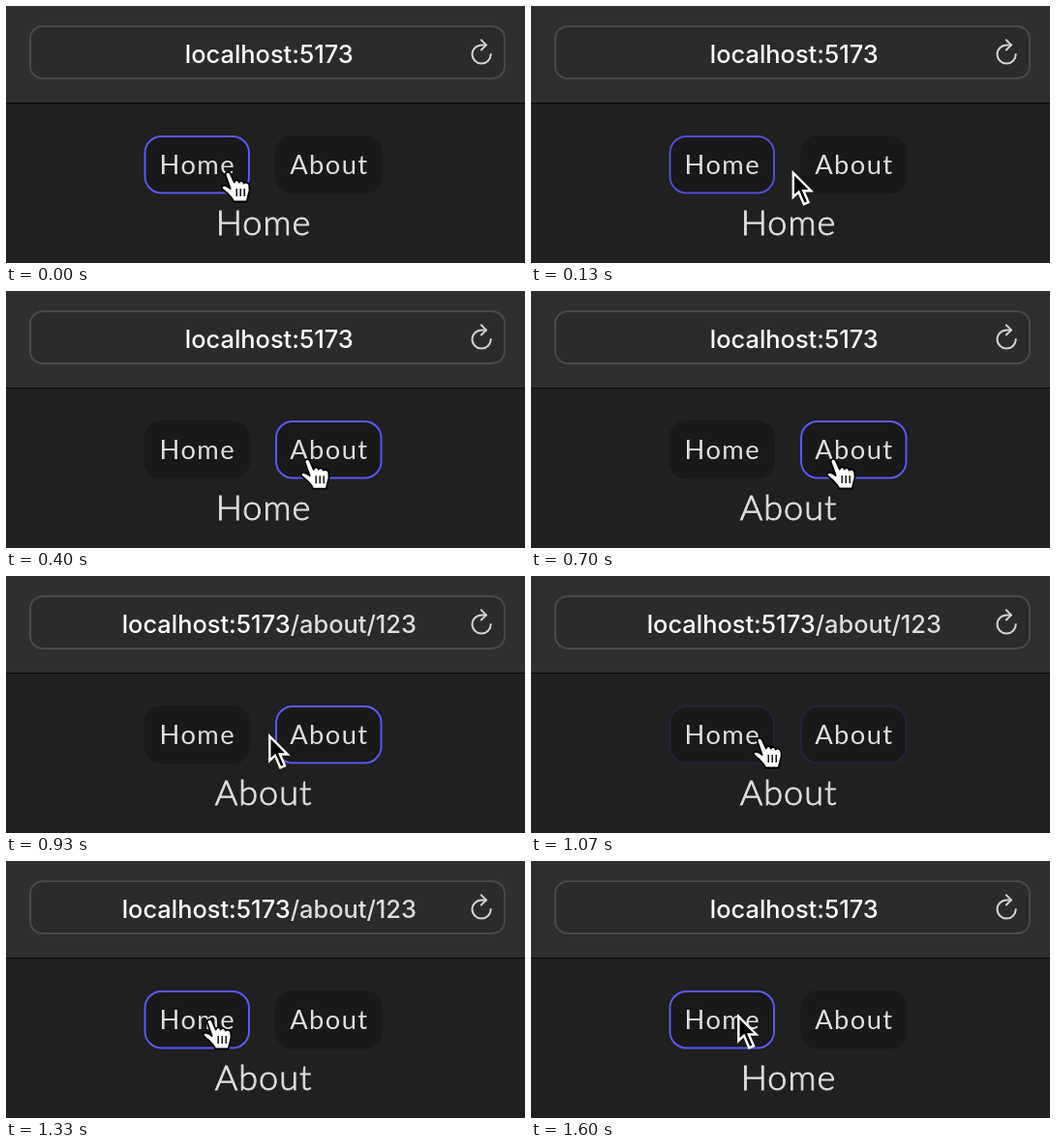
These frames come from a looping animation (536 by 266 pixels, 1730 ms). An HTML page:

```html
<!DOCTYPE html>
<html lang="en">
<head>
<meta charset="utf-8">
<title>Route navigation</title>
<style>
  html, body { margin: 0; width: 100%; height: 100%; overflow: hidden; background: #202020; }
  svg { display: block; }
  text { text-anchor: middle; }
  .url { font: 500 25.4px Inter, "Liberation Sans", sans-serif; fill: #fff; }
  .path { fill: #dddddf; }
  .button rect { fill: #191919; }
  .button .ring { fill: none; stroke: #5b59f3; stroke-width: 2; }
  .button text { font: 400 27.3px Lato, "Open Sans", sans-serif; letter-spacing: 1.4px; fill: #dedede; }
  .heading { font: 300 36px Lato, "Open Sans", sans-serif; letter-spacing: 1px; fill: #dedede; stroke: #dedede; stroke-width: .9; }
  .reload { fill: none; stroke: #d2d2d4; stroke-width: 2; stroke-linecap: round; stroke-linejoin: round; }
  .arrow { fill: #000; stroke: #fff; stroke-width: 2.4; }
  .hand { fill: #fff; stroke: #000; stroke-width: 1.8; stroke-linejoin: round; }
  .creases { stroke-width: 1.4; }
</style>
</head>
<body>
<svg width="536" height="266" viewBox="0 0 536 266">
  <rect width="536" height="266" fill="#202020"/>
  <rect width="536" height="100" fill="#2f2f31"/>
  <rect y="100" width="536" height="1" fill="#060606"/>

  <rect x="25" y="21" width="490" height="54" rx="13" fill="#2b2b2d" stroke="#49494b" stroke-width="2"/>
  <text class="url" x="271.8" y="59">localhost:5173<tspan class="path" id="path"></tspan></text>
  <g class="reload">
    <path d="M500.7 50A9.6 9.6 0 1 1 491.1 40.4H496"/>
    <path d="M490.8 35.3L496 40.4L490.8 45.5"/>
  </g>

  <g class="button">
    <rect x="142.5" y="134" width="109.5" height="60.5" rx="18"/>
    <rect class="ring" id="homeRing" x="143.5" y="135" width="107.5" height="58.5" rx="17"/>
    <text x="197.8" y="174">Home</text>
  </g>
  <g class="button">
    <rect x="278" y="134" width="110.5" height="60.5" rx="18"/>
    <rect class="ring" id="aboutRing" x="279" y="135" width="108.5" height="58.5" rx="17"/>
    <text x="333.9" y="174">About</text>
  </g>
  <text class="heading" id="heading" x="266" y="237.4">Home</text>

  <g id="cursor">
    <path class="arrow" id="arrow" transform="translate(2 -6)"
      d="M1.3 3V28L7 22.7L12.3 35.3L17 33.3L11.8 21.5H19.7Z"/>
    <g class="hand" id="hand" transform="translate(-.8 0)">
      <path d="M-2.5 3C-3 0 1 -1.5 2.5 1.5L6.5 10.5C7 8 11 7.5 11.5 10.5C12.5 8.5 16 8.5 16.5 11.5
        C18 10 21.5 10.5 22 13.5C22.8 17 22.5 20 21 24L19.5 30.5H6C5 27 2 24.5 -1 21.5
        C-3.5 19 -6.5 18 -6.5 15.5C-6 12.8 -1.5 13.2 2.5 17Z"/>
      <path class="creases" d="M9 17V25M13 17V25M17 17V25"/>
    </g>
  </g>
</svg>
<script>
const LOOP = 1730, TICK = 100 / 3, FADE = 250;
const $ = id => document.getElementById(id);

// Pointer path: tick, x, y
const route = [
  [0, 230, 172], [1, 234, 173], [3, 256, 175], [5, 279, 176.5], [7, 290, 177],
  [10, 305, 175.5], [12, 312, 174.2], [13, 313, 174], [23, 313, 174], [24, 311, 173.5],
  [26, 297, 171.5], [28, 269, 169], [30, 253, 168.5], [32, 237, 168],
  [35, 222, 166], [38, 213, 164.5], [40, 211, 164], [52, 211, 164]
];

const between = (k, from, to) => k >= from && k < to;

function pointAt(k) {
  const i = Math.max(1, route.findIndex(p => p[0] >= k));
  const [a, ax, ay] = route[i - 1], [b, bx, by] = route[i];
  const f = (k - a) / (b - a);
  return [ax + (bx - ax) * f, ay + (by - ay) * f];
}

// CSS "ease": cubic-bezier(.25, .1, .25, 1)
function ease(x) {
  if (x <= 0) return 0;
  if (x >= 1) return 1;
  const curve = (s, p, q) => 3 * s * (1 - s) * ((1 - s) * p + s * q) + s ** 3;
  let lo = 0, hi = 1;
  for (let i = 0; i < 20; i++) {
    const mid = (lo + hi) / 2;
    if (curve(mid, .25, .25) < x) lo = mid; else hi = mid;
  }
  return curve(lo, .1, 1);
}

const fadeFrom = (k, start) => ease((k - start) * TICK / FADE);

function setText(id, value) {
  if ($(id).textContent !== value) $(id).textContent = value;
}

function draw(ms) {
  const k = Math.floor((ms % LOOP + 3.4) / TICK);
  const [x, y] = pointAt(k);
  const isArrow = between(k, 3, 5) || between(k, 22, 24) || between(k, 28, 31) || k >= 48;

  $("cursor").setAttribute("transform", `translate(${x} ${y})`);
  $("arrow").style.display = isArrow ? "" : "none";
  $("hand").style.display = isArrow ? "none" : "";
  $("homeRing").style.opacity = k < 31 ? 1 - fadeFrom(k, 3) : fadeFrom(k, 31);
  $("aboutRing").style.opacity = k < 28 ? fadeFrom(k, 5) : 1 - fadeFrom(k, 28);
  setText("heading", between(k, 21, 47) ? "About" : "Home");
  setText("path", between(k, 22, 48) ? "/about/123" : "");
}

const start = performance.now();
function loop() {
  draw(performance.now() - start);
  requestAnimationFrame(loop);
}
loop();
</script>
</body>
</html>
```
